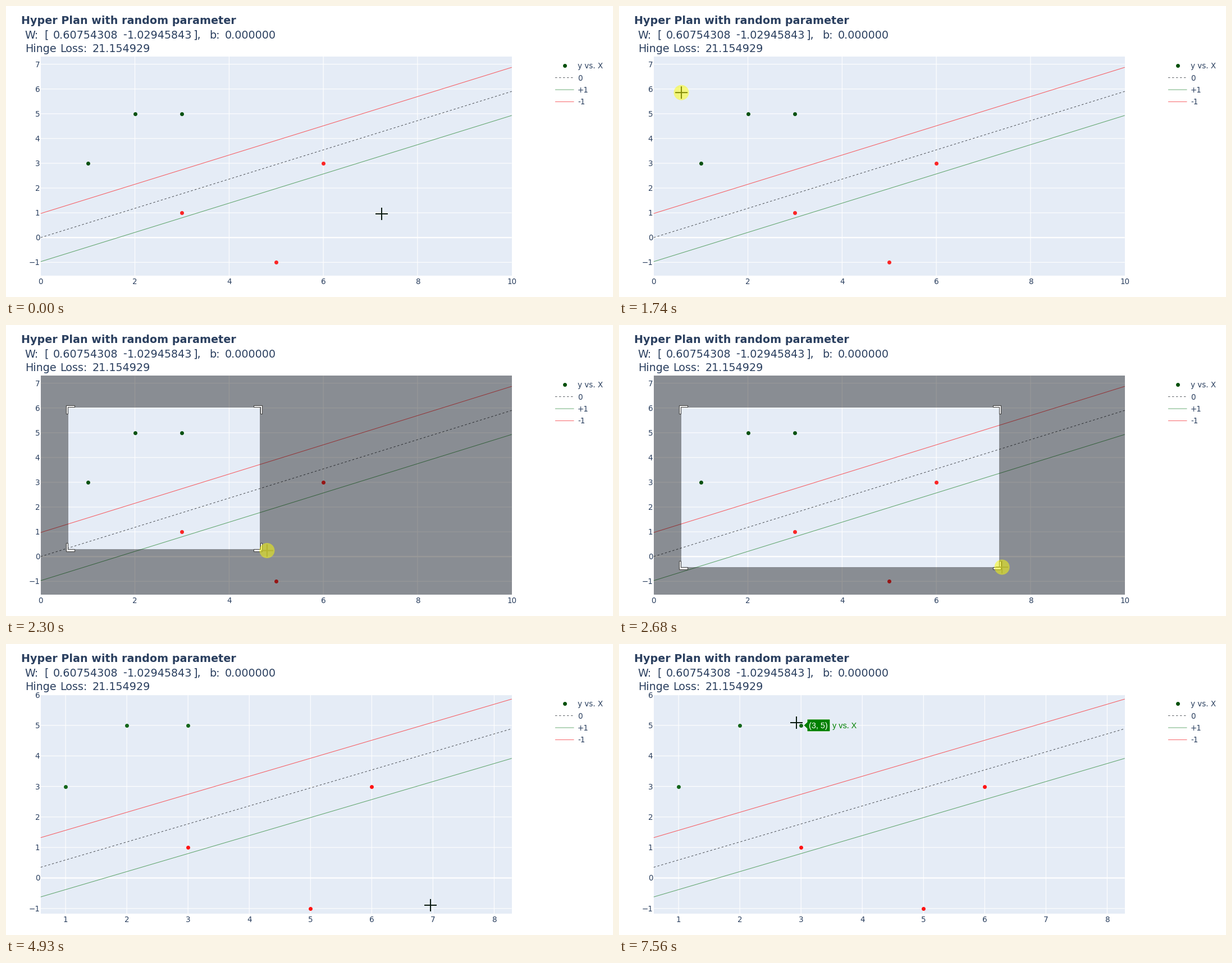
A matplotlib script that plays this animation: 1081x518 px, repeating every 8000 ms.

```python
import numpy as np
import matplotlib.pyplot as plt
from matplotlib.animation import FuncAnimation
from matplotlib.patches import Circle, PathPatch, Polygon, Rectangle
from matplotlib.path import Path

W, H, DPI = 1081, 518, 100
PX = 72 / DPI                      # points per pixel
LEFT, RIGHT, TOP, BOTTOM = 61.8, 900.7, 90, 480
SCALE = 1.129                      # page zoom of the chart
INK = "#2a3f5f"
RED, GREEN, GREY = "#f7555a", "#5aa267", "#4b4f55"
WEIGHTS = (0.60754308, -1.02945843)
POINTS = [(1, 3, 1), (2, 5, 1), (3, 5, 1), (3, 1, 0), (6, 3, 0), (5, -1, 0)]

INTERVAL, FRAMES = 40, 200
# The screen was refreshed about 13 times a second, slightly unevenly.
TICKS = np.interp(range(104),
                  [0, 1, 21, 32, 50, 63, 74, 85, 96, 104],
                  [0, 70, 1590, 2450, 3850, 4850, 5700, 6540, 7380, 8000])

# time, x, y of the pointer
PATH = np.array([
    (0, 669, 370), (150, 640, 338), (220, 590, 295), (300, 470, 245),
    (380, 327, 197), (450, 240, 178), (530, 165, 154), (670, 128, 143),
    (760, 128, 142), (980, 124, 145), (1080, 124, 145), (1440, 112, 146),
    (1510, 112, 146), (1670, 111, 147), (1746, 111, 154), (1824, 124, 178),
    (1903, 167, 251), (2000, 225, 315), (2200, 385, 385), (2370, 530, 415),
    (2600, 651, 430), (2683, 682, 431), (2850, 724, 444), (3000, 747, 453),
    (3220, 759, 458), (3770, 759, 458), (3830, 758, 458), (4080, 758, 458),
    (4300, 757, 464), (4850, 757, 464), (4927, 756, 465), (5000, 752, 455),
    (5160, 710, 435), (5400, 540, 352), (5630, 430, 304), (6470, 248, 181),
    (6700, 231, 150), (6900, 228, 137), (7080, 238, 126), (7310, 295, 146),
    (7380, 303, 143), (7535, 316, 140)])
PRESS, DRAG, RELEASE, ZOOM = 1650, 1800, 4535, 4840
ANCHOR = (111, 147)
DRAG_LAG = 15
HOVER_RADIUS = 20

fig = plt.figure(figsize=(W / DPI, H / DPI), dpi=DPI, facecolor="white")
ax = fig.add_axes([0, 0, 1, 1])
ax.set(xlim=(0, W), ylim=(H, 0))
ax.axis("off")


def text(x, y, s, size=13.55, color=INK, **kw):
    kw.setdefault("family", "DejaVu Sans")
    return ax.text(x, y, s, fontsize=size * PX, color=color,
                   va="baseline", **kw)


def line(xs, ys, color, width=1.0, z=2, dotted=False):
    dash = (0, (3.5 / width, 3.5 / width)) if dotted else "-"
    return ax.plot(xs, ys, color=color, lw=width * PX, ls=dash, zorder=z,
                   snap=False, solid_capstyle="butt")[0]


def dot(x, y, color):
    return ax.plot([x], [y], "o", color=color, ms=7 * PX, mew=0, zorder=3)[0]


class View:
    """One zoom state: maps data to pixels and owns its artists."""

    def __init__(self, xlim, ylim, xticks, yticks, dot_colors):
        self.xlim, self.ylim = xlim, ylim
        self.artists = []
        add = self.artists.append
        for v in xticks:
            x = self.px(v)
            if LEFT < x < RIGHT - 1:
                add(line([x, x], [TOP, BOTTOM], "white", SCALE, 1.5))
            add(text(x, 495, str(v), ha="center"))
        for v in yticks:
            y = self.py(v)
            width = SCALE * (1 if v else 2)
            add(line([LEFT, RIGHT], [y, y], "white", width, 1.5))
            add(text(60.3, y + 5, str(v).replace("-", "\u2212"), ha="right"))
        slope, margin = -WEIGHTS[0] / WEIGHTS[1], -1 / WEIGHTS[1]
        ends = np.array(xlim)
        for side, color in ((0, GREY), (-1, GREEN), (1, RED)):
            add(line(self.px(ends), self.py(slope * ends + side * margin),
                     color, dotted=side == 0))
        for x, y, label in POINTS:
            add(dot(self.px(x), self.py(y), dot_colors[label]))

    def px(self, x):
        a, b = self.xlim
        return LEFT + (x - a) / (b - a) * (RIGHT - LEFT)

    def py(self, y):
        a, b = self.ylim
        return BOTTOM - (y - a) / (b - a) * (BOTTOM - TOP)

    def show(self, on):
        for artist in self.artists:
            artist.set_visible(on)

    def nearest(self, x, y):
        def gap(p):
            return np.hypot(self.px(p[0]) - x, self.py(p[1]) - y)
        best = min(POINTS, key=gap)
        return best if gap(best) <= HOVER_RADIUS else None


def build_static():
    ax.add_patch(Rectangle((LEFT, TOP), RIGHT - LEFT, BOTTOM - TOP,
                           fc="#e5ecf6", lw=0))
    size = 19.2
    text(27, 32.5, "Hyper Plan with random parameter", size, weight="bold")
    for x, word in ((33.8, "W:"), (68.2, "["), (83.7, "0.60754308"),
                    (208, "-"), (216, "1.02945843"), (333, "],"),
                    (362.2, "b:"), (389.6, "0.000000")):
        text(x, 57.5, word, size)
    for x, word in ((33.8, "Hinge"), (95.8, "Loss:"), (153.6, "21.154929")):
        text(x, 82.5, word, size)
    dot(995, 106, "#06500c")
    legend = (("y vs. X", None), ("0", GREY), ("+1", GREEN), ("-1", RED))
    for i, (name, color) in enumerate(legend):
        y = 106.2 + 21.4 * i
        text(1018, y + 5, name)
        if color:
            line([978, 1011.5], [y, y], color, 0.9, dotted=name == "0")


def corner(x, y, sx, sy, arm):
    """Outline of an L-shaped handle; sx, sy point into the box."""
    shape = np.array([(-3.5, arm - .5), (-.5, arm - .5), (-.5, -.5),
                      (arm - .5, -.5), (arm - .5, -3.5), (-3.5, -3.5)])
    return shape * SCALE * (sx, sy) + (x, y)


def ring(x0, y0, x1, y1):
    return [(x0, y0), (x1, y0), (x1, y1), (x0, y1), (x0, y0)]


RING_CODES = [Path.MOVETO] + [Path.LINETO] * 3 + [Path.CLOSEPOLY]

build_static()
full = View((0, 10), (-1.538, 7.309), range(0, 11, 2), range(-1, 8),
            {1: "#0a5212", 0: "#fb2626"})
zoomed = View((0.594, 8.287), (-1.169, 6.010), range(1, 9), range(-1, 7),
              {1: "#14661a", 0: "#ff1414"})

shade = ax.add_patch(PathPatch(Path(ring(0, 0, 1, 1), RING_CODES),
                               fc="black", lw=0, zorder=4))
handles = [ax.add_patch(Polygon([(0, 0), (1, 0), (1, 1)], fc="white",
                                ec="#444444", lw=SCALE * PX, zorder=5))
           for _ in range(4)]
tag = ax.add_patch(Polygon([(0, 0), (1, 0), (1, 1)], ec="white", lw=PX,
                           zorder=6))
tag_value = text(0, 0, "", 14.4, "white", family="Liberation Sans", zorder=7)
tag_name = text(0, 0, "y vs. X", 14.4, family="Liberation Sans", zorder=7)
cross = [line([0, 0], [0, 0], "black", 2, 8) for _ in range(2)]
halo = ax.add_patch(Circle((0, 0), 13.5, fc="yellow", alpha=0.5, lw=0,
                           zorder=9))


def pointer(t):
    return [np.interp(t, PATH[:, 0], PATH[:, k]) for k in (1, 2)]


def draw_selection(t):
    on = DRAG <= t < ZOOM
    for artist in (shade, *handles):
        artist.set_visible(on)
    if not on:
        return
    x0, y0 = ANCHOR
    x1, y1 = pointer(t - DRAG_LAG)
    hole = ring(x0, y0, x1, y1)[::-1]
    shade.set_path(Path(ring(LEFT, TOP, RIGHT, BOTTOM) + hole,
                        RING_CODES * 2))
    shade.set_alpha(0.4 if t > DRAG + 80 else 0.2)
    arm = min(x1 - x0, y1 - y0, 20) / SCALE // 2 if x1 - x0 < 22 else 10
    spots = ((x0, y0, 1, 1), (x1, y0, -1, 1), (x1, y1, -1, -1), (x0, y1, 1, -1))
    for handle, spot in zip(handles, spots):
        handle.set_xy(corner(*spot, arm))


def draw_tag(point, view):
    for artist in (tag, tag_value, tag_name):
        artist.set_visible(point is not None)
    if point is None:
        return
    x, y, label = point
    color = "#008000" if label else "#ff0000"
    px, py = view.px(x), view.py(y)
    l, r = px + 10.8, px + 51.8
    tag.set_xy([(px + 4.5, py), (l, py - 6), (l, py - 11), (r, py - 11),
                (r, py + 11), (l, py + 11), (l, py + 6)])
    tag.set_facecolor(color)
    tag_value.set_text(f"({x}, {y})")
    tag_value.set_position((px + 14, py + 5.2))
    tag_name.set_position((px + 56, py + 5.2))
    tag_name.set_color(color)


def draw_pointer(x, y, pressed, dimmed):
    color = "#6b6b62" if dimmed else "#0a1a10"
    cross[0].set_data([x - 11, x + 11], [y, y])
    cross[1].set_data([x, x], [y - 11, y + 11])
    for arm in cross:
        arm.set_color(color)
    halo.set_visible(pressed)
    halo.set_center((x, y))


def update(i):
    now = i * INTERVAL + 35
    t = TICKS[np.searchsorted(TICKS, now, side="right") - 1]
    view = zoomed if t >= ZOOM else full
    full.show(view is full)
    zoomed.show(view is zoomed)
    x, y = pointer(t)
    pressed = PRESS <= t < RELEASE
    busy = PRESS <= t < ZOOM
    draw_selection(t)
    draw_tag(None if busy else view.nearest(x, y), view)
    draw_pointer(x, y, pressed, pressed and t >= DRAG)
    return []


anim = FuncAnimation(fig, update, frames=FRAMES, interval=INTERVAL,
                     init_func=lambda: update(0), repeat=True, repeat_delay=0)
plt.show()
```
